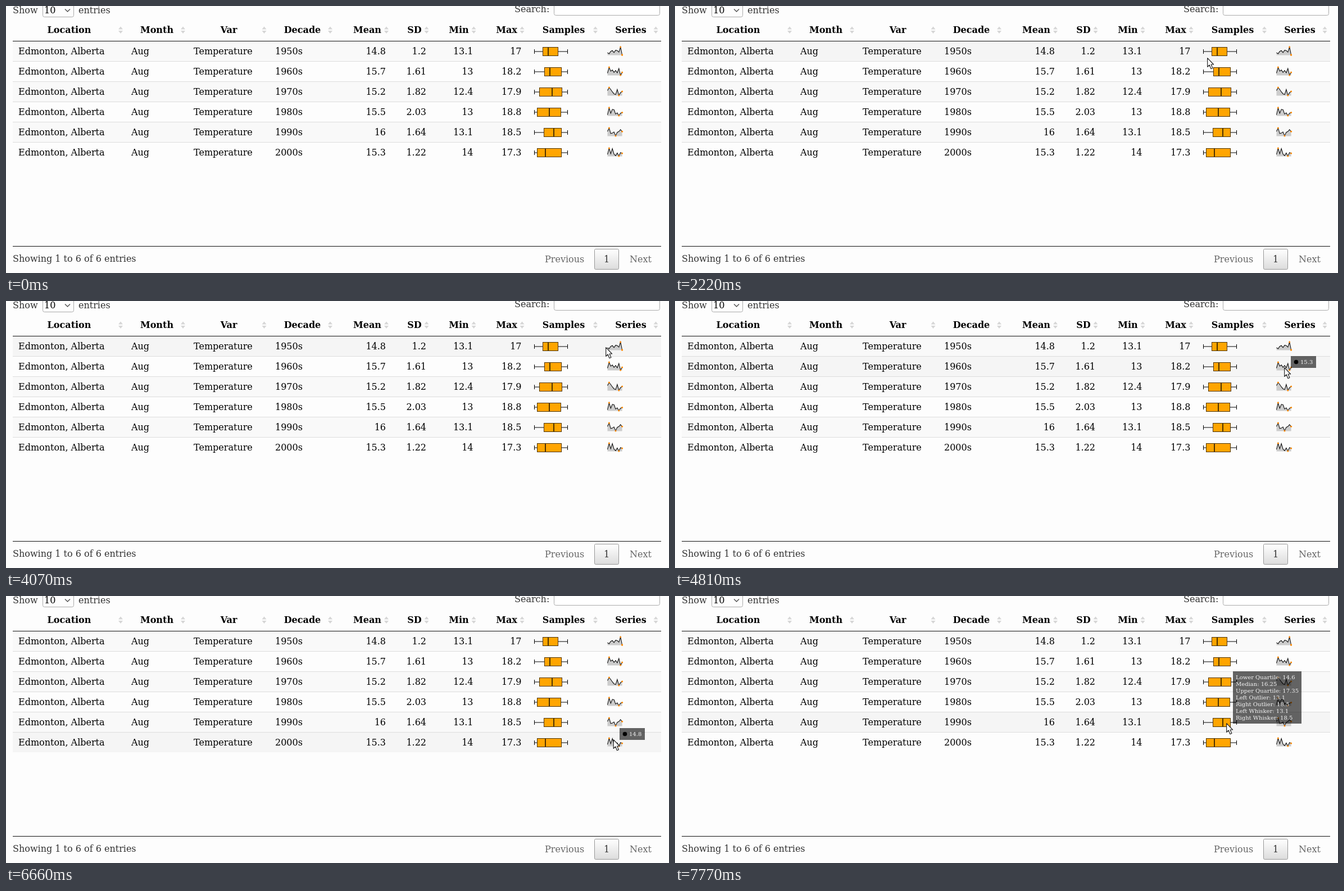
Animation of 1180x475 px, one loop 8000 ms. Source, as an HTML page:

```html
<!DOCTYPE html>
<html lang="en">
<head>
<meta charset="utf-8">
<title>Temperature table</title>
<style>
  html, body { margin: 0; width: 100%; height: 100%; overflow: hidden; background: #fdfdfd; }
  svg { display: block; }
  text { font: 16px "DejaVu Serif", "Noto Serif", serif; white-space: pre; }
  .head { font-weight: bold; }
  .soft { fill: #333; }
  .off { fill: #666; }
  .tip text { font-size: 10px; fill: #f4f4f4; }
</style>
</head>
<body>
<svg id="stage" width="1180" height="475" viewBox="0 0 1180 475">
  <defs>
    <linearGradient id="button" x2="0" y2="1">
      <stop stop-color="#fff"/><stop offset="1" stop-color="#dcdcdc"/>
    </linearGradient>
  </defs>
  <g id="table"></g>
  <g class="soft">
    <text x="12" y="13">Show</text>
    <text x="129" y="13">entries</text>
    <text x="905" y="11">Search:</text>
    <text x="12" y="455">Showing 1 to 6 of 6 entries</text>
  </g>
  <g fill="none" stroke="#aaa">
    <rect x="65.5" y="-8.5" width="55" height="28" rx="3"/>
    <rect x="975.5" y="-14.5" width="188" height="31" rx="3" fill="#fff"/>
    <path d="M105 5.5l4.5 4.5 4.5-4.5" stroke="#555" stroke-width="1.5"/>
  </g>
  <text x="68" y="13">10</text>
  <path d="M12 62.5H1166M12 427.5H1166" stroke="#111"/>
  <text class="off" x="959" y="456">Previous</text>
  <text class="off" x="1110" y="456">Next</text>
  <rect x="1047.5" y="432.5" width="43" height="36" rx="2" fill="url(#button)" stroke="#979797"/>
  <text class="soft" x="1069" y="456" text-anchor="middle">1</text>
  <g id="tip" class="tip"></g>
  <path id="cursor" d="M.7 .7V16.3L4.2 13 7 19.7 9.9 18.5 7.1 12H11.6Z"
        fill="#fff" stroke="#222" stroke-width="1.2" stroke-linejoin="round"/>
</svg>
<script>
const NS = "http://www.w3.org/2000/svg";
const $ = id => document.getElementById(id);

function add(parent, tag, attrs, content) {
  const node = document.createElementNS(NS, tag);
  for (const key in attrs) node.setAttribute(key, attrs[key]);
  if (content !== undefined) node.textContent = content;
  parent.appendChild(node);
  return node;
}

// title, title centre, sort arrow centre
const heads = [
  ["Location", 112.5, 204], ["Month", 268.5, 315], ["Var", 396.5, 459.5],
  ["Decade", 527.5, 577], ["Mean", 643, 677], ["SD", 727, 748.5],
  ["Min", 806, 832.5], ["Max", 891, 918.5], ["Samples", 992.5, 1049],
  ["Series", 1112, 1156.5]
];
const columnX = [22, 223, 334, 479, 676, 748, 831.5, 917.5];

// numbers: mean, sd, min, max; box: left, median, right; series: 0 to 1
const rows = [
  { decade: "1950s", numbers: [14.8, 1.2, 13.1, 17], box: [955, 965, 982],
    series: [.28, .15, .45, .55, .3, .6, .55, .35, 1, 0] },
  { decade: "1960s", numbers: [15.7, 1.61, 13, 18.2], box: [958, 968, 988],
    series: [.25, 1, .5, .65, .35, .6, .3, .85, 0, .35] },
  { decade: "1970s", numbers: [15.2, 1.82, 12.4, 17.9], box: [949, 972, 989],
    series: [.6, 1, .75, .45, .2, .1, .75, 0, .35, .5] },
  { decade: "1980s", numbers: [15.5, 2.03, 13, 18.8], box: [945, 967, 987],
    series: [.1, 1, .3, .8, .75, .2, .35, 0, .3, .4] },
  { decade: "1990s", numbers: [16, 1.64, 13.1, 18.5], box: [957, 975, 988],
    series: [.55, 1, .3, .35, .5, 0, .45, .55, .8, .55] },
  { decade: "2000s", numbers: [15.3, 1.22, 14, 17.3], box: [945, 960, 988],
    series: [.2, 1, .3, .95, .25, .05, .4, 0, .45, .35] }
];
const quartiles = {
  0: [14.1, 14.7, 15.85], 4: [14.6, 16.25, 17.35], 5: [14.3, 15.1, 16.65]
};

function drawHead(g, [title, x, arrow]) {
  add(g, "text", { x, y: 48, class: "head", "text-anchor": "middle" }, title);
  add(g, "path", {
    d: `M${arrow - 4} 41.5l4-5 4 5zM${arrow - 4} 44l4 5 4-5z`, fill: "#d6d6d6"
  });
}

function drawBox(g, [left, median, right], y) {
  add(g, "path", {
    d: `M940.5 ${y - 4}v8M940 ${y}H1000M999.5 ${y - 4}v8`, stroke: "#000", fill: "none"
  });
  add(g, "rect", {
    x: left + .5, y: y - 7.5, width: right - left, height: 15, fill: "#ffa500", stroke: "#4d3200"
  });
  add(g, "path", { d: `M${median} ${y - 7}v14`, stroke: "#000", "stroke-width": 1.4 });
}

function drawSeries(g, values, top) {
  const points = values.map((v, i) => [1070.5 + i * 2.9, top + 14 * (1 - v)]);
  const base = top + 14.5;
  const line = points.map(p => p.join(" ")).join("L");
  add(g, "path", { d: `M1070.5 ${base}L${line}V${base}Z`, fill: "#ccc" });
  add(g, "path", { d: "M" + line, fill: "none", stroke: "#111", "stroke-width": 1.1 });
  const spots = [values.indexOf(1), values.indexOf(0), values.length - 1];
  for (const i of spots)
    add(g, "circle", { cx: points[i][0], cy: points[i][1], r: 1.5, fill: "#f80" });
}

const table = $("table");
heads.forEach(head => drawHead(table, head));
const bands = rows.map((row, i) => {
  const y = 36 * i;
  const band = add(table, "rect", { x: 12, y: 63 + y, width: 1154, height: 35 });
  if (i) add(table, "rect", { x: 12, y: 62 + y, width: 1154, height: 1, fill: "#ddd" });
  ["Edmonton, Alberta", "Aug", "Temperature", row.decade, ...row.numbers].forEach((cell, c) =>
    add(table, "text", { x: columnX[c], y: 86 + y, "text-anchor": c < 4 ? "start" : "end" }, cell));
  drawBox(table, row.box, 81 + y);
  drawSeries(table, row.series, 73 + y);
  return band;
});

// One pointer pose per step: x, y, tooltip ("box" or a series value), tooltip x
const STEP = 370, LOOP = 8000;
const poses = [
  null, [253, 161], [715, 103], [775, 80], [838, 209], [886, 113], [947, 92],
  [974, 82, "box"], [988, 82, "box"], [1002, 82], [1052, 82], [1067, 82],
  [1075, 83, "14.4"], [1084, 118, "15.3"], [1087, 146, "12.9"], [1088, 168],
  [1090, 200], [1086, 230, "13.1"], [1080.5, 255, "14.8"],
  [995, 265, "box", 1056], [981, 261, "box"], [981, 226, "box"]
];

function boxLines(i) {
  const [low, mid, high] = quartiles[i];
  const [, , min, max] = rows[i].numbers;
  return [
    `Lower Quartile: ${low}`, `Median: ${mid}`, `Upper Quartile: ${high}`,
    `Left Outlier: ${min}`, `Right Outlier: ${max}`,
    `Left Whisker: ${min}`, `Right Whisker: ${max}`
  ];
}

function drawTip(kind, x, bottom, row) {
  const tip = $("tip");
  tip.replaceChildren();
  if (!kind) return;
  const isBox = kind === "box";
  const [width, height] = isBox ? [122, 93] : [45, 21];
  const y = bottom - height;
  add(tip, "rect", { x, y, width, height, fill: "#000", "fill-opacity": .6 });
  if (isBox) {
    boxLines(row).forEach((line, i) => add(tip, "text", { x: x + 5, y: y + 14 + 12 * i }, line));
  } else {
    add(tip, "circle", { cx: x + 9.5, cy: y + 10.5, r: 3.8 });
    add(tip, "text", { x: x + 17, y: y + 14 }, kind);
  }
}

function show(step) {
  const pose = poses[step];
  const [x, y, kind, tipX] = pose || [0, 0];
  const hover = step > 1 ? Math.floor((y - 62) / 36) : -1;
  bands.forEach((band, i) =>
    band.setAttribute("fill", i === hover ? "#f5f5f5" : i % 2 ? "#fdfdfd" : "#f9f9f9"));
  $("cursor").setAttribute("visibility", pose ? "visible" : "hidden");
  $("cursor").setAttribute("transform", `translate(${x} ${y})`);
  drawTip(kind, Math.round(tipX || x + 11.5), y + 1, hover);
}

let shown = -1;
function tick() {
  const step = Math.floor(performance.now() % LOOP / STEP);
  if (step !== shown) show(shown = step);
  requestAnimationFrame(tick);
}
tick();
</script>
</body>
</html>
```
